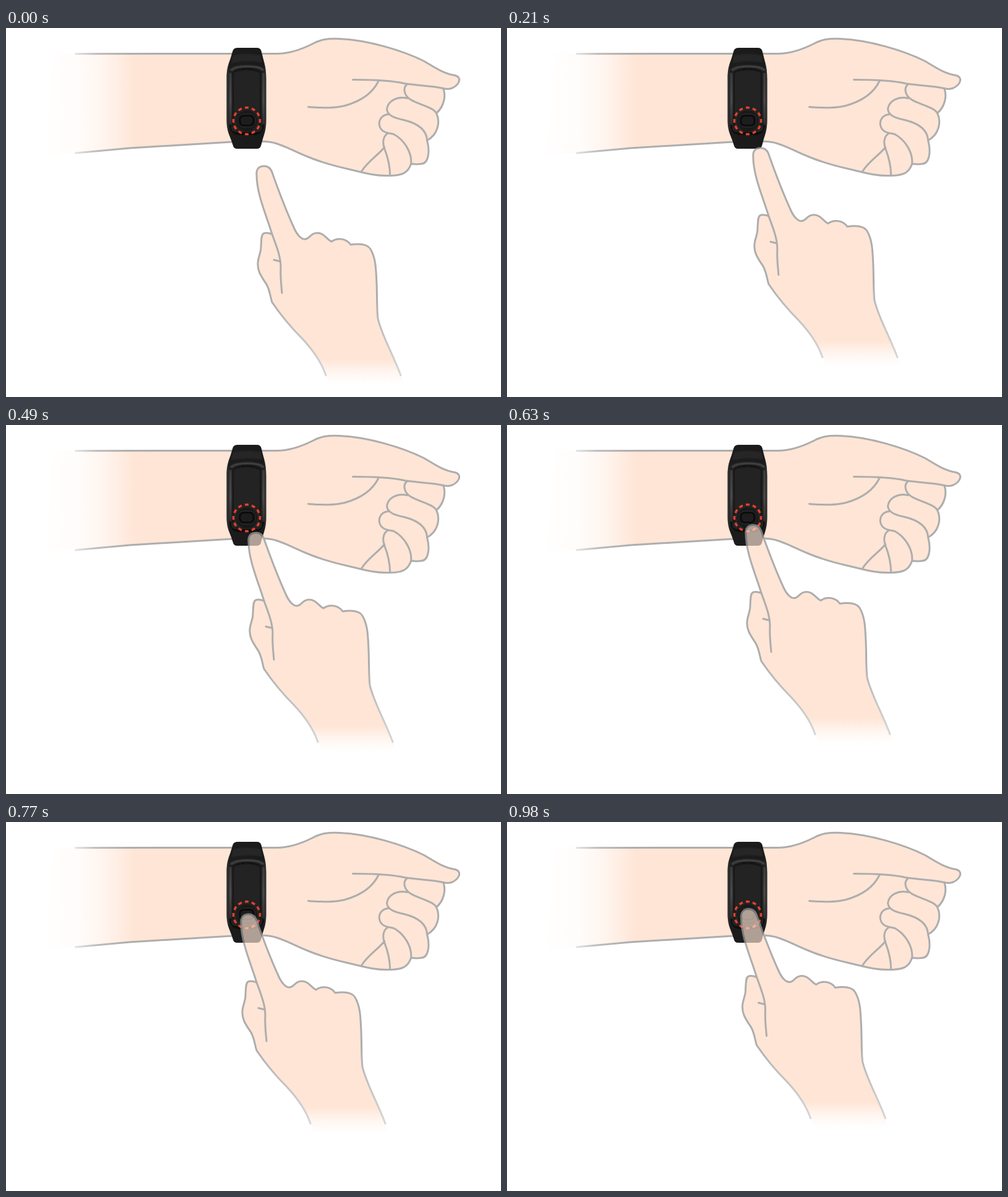
Recreate the animation shown at these times as an HTML page. Size 800 by 596 pixels, loop 1750 ms.

```html
<!DOCTYPE html>
<html lang="en">
<head>
<meta charset="utf-8">
<title>Tap the band</title>
<style>
  html, body { margin: 0; width: 100%; height: 100%; overflow: hidden; background: #fff; }
  svg { display: block; width: 100%; height: 100%; }
  .line { fill: none; stroke-width: 3; stroke-linecap: round; stroke-linejoin: round; }
  .inner { stroke: #adadad; }
</style>
</head>
<body>
<svg viewBox="0 0 800 596">
  <defs>
    <linearGradient id="armSkin" gradientUnits="userSpaceOnUse" x1="65" y1="0" x2="210" y2="0">
      <stop offset="0" stop-color="#ffe5d5" stop-opacity=".03"/>
      <stop offset=".34" stop-color="#ffe5d5" stop-opacity=".09"/>
      <stop offset=".65" stop-color="#ffe5d5" stop-opacity=".4"/>
      <stop offset="1" stop-color="#ffe5d5"/>
    </linearGradient>
    <linearGradient id="armLine" gradientUnits="userSpaceOnUse" x1="110" y1="0" x2="200" y2="0">
      <stop offset="0" stop-color="#adadad" stop-opacity=".3"/>
      <stop offset=".4" stop-color="#adadad" stop-opacity=".8"/>
      <stop offset="1" stop-color="#adadad"/>
    </linearGradient>
    <linearGradient id="handSkin" gradientUnits="userSpaceOnUse" x1="0" y1="534" x2="0" y2="576">
      <stop offset="0" stop-color="#ffe5d5"/>
      <stop offset=".5" stop-color="#ffe5d5" stop-opacity=".38"/>
      <stop offset="1" stop-color="#ffe5d5" stop-opacity="0"/>
    </linearGradient>
    <linearGradient id="handLine" gradientUnits="userSpaceOnUse" x1="0" y1="440" x2="0" y2="561">
      <stop offset="0" stop-color="#adadad"/>
      <stop offset=".35" stop-color="#bdbdbd"/>
      <stop offset="1" stop-color="#d6d6d6"/>
    </linearGradient>
    <linearGradient id="case" gradientUnits="userSpaceOnUse" x1="356" y1="0" x2="421" y2="0">
      <stop offset="0" stop-color="#3a3a3a"/>
      <stop offset=".08" stop-color="#1c1c1c"/>
      <stop offset=".92" stop-color="#1a1a1a"/>
      <stop offset="1" stop-color="#333"/>
    </linearGradient>
    <linearGradient id="edge" gradientUnits="userSpaceOnUse" x1="0" y1="68" x2="0" y2="165">
      <stop offset="0" stop-color="#505050"/>
      <stop offset=".5" stop-color="#6a6a6a"/>
      <stop offset="1" stop-color="#333"/>
    </linearGradient>
    <filter id="soft" x="-20%" y="-20%" width="140%" height="140%">
      <feGaussianBlur stdDeviation=".8"/>
    </filter>
  </defs>

  <g id="arm" transform="translate(-.4 .5)">
    <path fill="url(#armSkin)" d="M78 41H438C462 41 482 32 496 25C509 18 520 16 540 17
      C586 19 642 36 676 53C690 61 706 73 726 76C733 78 735 83 731 89C726 96 717 100 707 97
      C712 109 708 127 696 137C703 152 698 172 681 181C686 200 683 219 671 219
      C666 220 660 219 655 219C650 234 640 238 620 238C596 239 574 232 552 227
      C530 222 506 215 487 207C464 198 447 187 429 184C409 181 380 183 357 184
      L200 194L65 205Z"/>
    <path class="line" stroke="url(#armLine)" stroke-linecap="butt" d="M113 41.200L438 41C462 41 482 32 496 25C509 18 520 16 540 17
      C586 19 642 36 676 53C690 61 706 73 726 76C733 78 735 83 731 89C726 96 717 100 707 97
      C712 109 708 127 696 137C703 152 698 172 681 181C686 200 683 219 671 219
      C666 220 660 219 655 219C650 234 640 238 620 238C596 239 574 232 552 227
      C530 222 506 215 487 207C464 198 447 187 429 184C409 181 380 183 357 184
      L200 193.500L113 201.500"/>
    <path class="line inner" d="M561 83C592 83 622 84 644 89C668 93 690 93 707 97
      M602 86C592 106 573 118 548 125C528 130 508 128 489 127
      M648 91C642 96 643 108 654 115C667 123 690 127 696 137
      M649 113C633 109 618 117 616 130C616 141 629 145 643 148C664 153 680 163 681 181
      M618 139C606 140 601 151 605 160C609 169 619 169 627 171C644 180 657 201 655 219
      M617 170C609 175 609 186 612 194C617 207 621 222 621 237
      M612 192C602 205 586 214 575 231"/>
  </g>

  <g id="hand">
    <path fill="url(#handSkin)" d="M430 333C421 303 405 268 405 237C404 227 410 223 417 223
      C425 223 429 228 431 236C441 264 454 298 466 324C471 335 478 342 484 341
      C491 340 492 331 503 331C514 331 518 341 526 345C537 337 551 341 557 350
      C571 348 584 349 589 357C598 372 598 391 599 412C600 433 599 450 601 469
      C607 496 625 526 638 561L644 576H524L517 561C509 537 493 517 479 502
      C464 487 447 468 430 443C427 434 427 425 421 414C414 403 406 394 407 379
      C408 367 413 362 412 352C413 343 412 335 416 332C420 330 425 331 430 333Z"/>
    <path class="line" stroke="url(#handLine)" stroke-linecap="butt" d="M517 561C509 537 493 517 479 502
      C464 487 447 468 430 443C427 434 427 425 421 414C414 403 406 394 407 379
      C408 367 413 362 412 352C413 343 412 335 416 332C420 330 425 331 430 333
      C421 303 405 268 405 237C404 227 410 223 417 223
      C425 223 429 228 431 236C441 264 454 298 466 324C471 335 478 342 484 341
      C491 340 492 331 503 331C514 331 518 341 526 345C537 337 551 341 557 350
      C571 348 584 349 589 357C598 372 598 391 599 412C600 433 599 450 601 469
      C607 496 625 526 638 561"/>
    <path class="line inner" d="M430 333C439 357 444 371 444 386C443 402 445 415 446 428
      M433 374.500L443 377"/>
  </g>
</svg>

<script>
const NS = "http://www.w3.org/2000/svg";
const hand = document.getElementById("hand");

const band = `
  <path fill="url(#case)" d="M375 32H405Q411 32 412.500 37L415 47C417 56 420.500 62 420.500 82V148
    C420.500 166 417 172 414.500 181L412 190Q411 195 405 195H374Q368 195 367 190L364 181
    C361 172 356.500 166 356.500 148V82C356.500 62 361 56 363.500 47L366.500 37Q368 32 375 32Z"/>
  <path fill="#2e2e2e" d="M367 44Q390 39 412 44L414 56Q389 51 364 57Z" opacity=".6" filter="url(#soft)"/>
  <path fill="#0e0e0e" d="M361 75Q361 64 374 62Q389 60 404 62Q417 64 417 75V156Q416 171 403 173H375Q362 171 361 156Z"/>
  <rect x="364" y="66" width="50" height="102" rx="7" fill="#232323"/>
  <g fill="none" filter="url(#soft)">
    <path stroke="#585858" stroke-width="2.500" d="M363 69Q367 64 377 63Q390 61 403 63Q413 64 416 69"/>
    <path stroke="#090909" stroke-width="2" d="M366 72Q370 67 389 66Q408 67 412 72V158M366 72V158"/>
    <path stroke="url(#edge)" stroke-width="2.500" d="M362.500 72V156M416 72V156"/>
  </g>
  <circle cx="389" cy="150" r="17" fill="#191919"/>
  <rect x="375" y="139" width="28" height="21" rx="9" fill="#111" stroke="#303030"/>
  <rect x="378.500" y="142" width="21" height="15" rx="6" fill="#1d1d1d" stroke="#080808" stroke-width="1.500"/>
  <circle cx="389" cy="150" r="21.500" fill="none" stroke="#e6402d" stroke-width="3.500"
    pathLength="120" stroke-dasharray="5.400 4.600" stroke-dashoffset="2.700" transform="rotate(-90 389 150)"/>`;

function addBand(before, opacity) {
  const g = document.createElementNS(NS, "g");
  g.innerHTML = band;
  g.setAttribute("opacity", opacity);
  hand.parentNode.insertBefore(g, before);
}
addBand(hand, 1);
addBand(null, 0.34); // lets the band show through the finger

const LOOP = 1750, STEP = 70, LAST = 14;
// step, x, y
const path = [
  [0, 0, 0], [4, -9.5, -39], [5, -11, -44], [7, -13, -49],
  [11, -25, -74], [14, -26.5, -82.5]
];

function place(step) {
  let i = 1;
  while (i < path.length - 1 && path[i][0] < step) i++;
  const [s0, x0, y0] = path[i - 1], [s1, x1, y1] = path[i];
  const k = (step - s0) / (s1 - s0);
  return [x0 + (x1 - x0) * k, y0 + (y1 - y0) * k];
}

const start = performance.now();
function draw(now) {
  const t = Math.max(0, now - start) % LOOP;
  const [x, y] = place(Math.min(LAST, Math.floor(t / STEP)));
  hand.setAttribute("transform", `translate(${x} ${y})`);
  requestAnimationFrame(draw);
}
draw(start);
</script>
</body>
</html>
```
